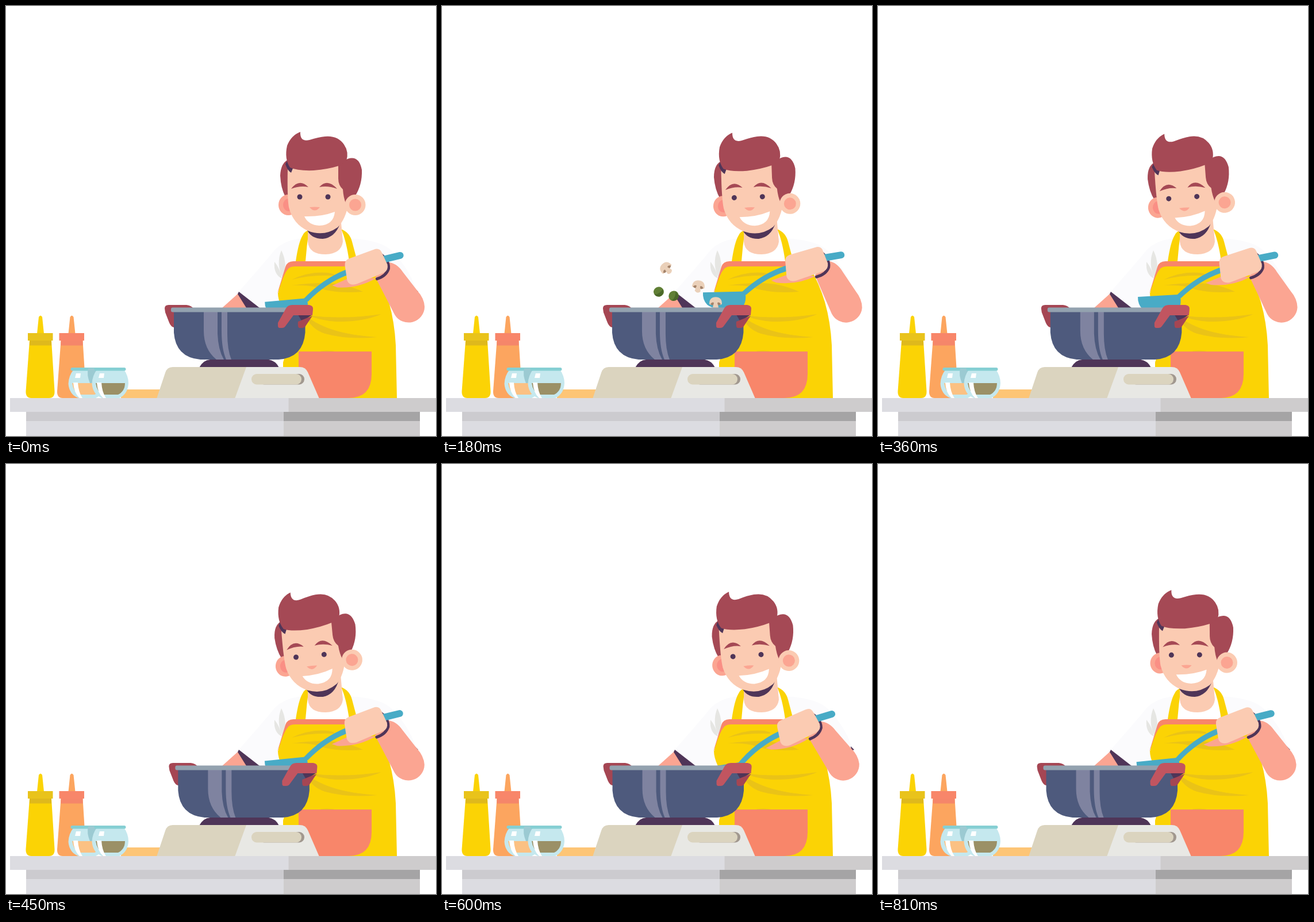
These frames come from a looping animation (748x748 px, 0.84 s). An HTML page with a canvas:

```html
<!DOCTYPE html>
<html lang="en">
<head>
<meta charset="utf-8">
<title>Cook at the stove</title>
<style>
html, body { margin: 0; width: 100%; height: 100%; overflow: hidden; background: #fff; }
canvas { display: block; width: 748px; height: 748px; }
</style>
</head>
<body>
<canvas id="stage" width="748" height="748"></canvas>
<script>
const ctx = document.getElementById('stage').getContext('2d');
const LOOP = 840, STEP = 30;
const C = {
  hair: '#a54955', dark: '#4f3558', skin: '#fbcbb2', pink: '#fba592', blush: '#fa8f85',
  yellow: '#fbd305', fold: '#eac317', orange: '#f8866a', peach: '#fca55f',
  shirt: '#fbfbfd', crease: '#e6e6e3', spoon: '#48abc6',
  pot: '#4e5a7d', shine: '#7f83a0', rim: '#93a2af', grip: '#c15560', gripDark: '#a54653',
  tan: '#dbd4bf', panel: '#e8e8e4', top: '#dcdce1', side: '#cecccd', shade: '#a5a4a5'
};

const paths = new Map();
function fill(color, d) {
  if (!paths.has(d)) paths.set(d, new Path2D(d));
  ctx.fillStyle = color;
  ctx.fill(paths.get(d));
}
function rect(color, x, y, w, h, r = 0) {
  ctx.fillStyle = color;
  ctx.beginPath();
  ctx.roundRect(x, y, w, h, r);
  ctx.fill();
}
function oval(color, x, y, rx, ry = rx) {
  ctx.fillStyle = color;
  ctx.beginPath();
  ctx.ellipse(x, y, rx, ry, 0, 0, 7);
  ctx.fill();
}
function line(color, width, d) {
  ctx.strokeStyle = color;
  ctx.lineWidth = width;
  ctx.lineCap = 'round';
  ctx.stroke(new Path2D(d));
}
function group(x, y, angle, draw) {
  ctx.save();
  ctx.translate(x, y);
  ctx.rotate(angle);
  draw();
  ctx.restore();
}
function pivot(x, y, angle, draw) {
  group(x, y, angle, () => { ctx.translate(-x, -y); draw(); });
}
// Rises from 0 to 1 at the peak time, then falls back to 0 at the loop's end
const tent = (t, peak) => t < peak ? t / peak : (LOOP - t) / (LOOP - peak);
// Smooth stirring swing, slightly biased upwards
const swing = t => 0.1 + 0.74 * Math.sin((t - 8) / LOOP * 2 * Math.PI);

function bottle(dx, body, cap, neck) {
  group(dx, 0, 0, () => {
    fill(body, 'M54 570L57 541Q60 536 63 541L66 570Z');
    fill(body, 'M41 582H79L84.5 670Q85 682 75 682H44Q34 682 34.5 670Z');
    rect(neck, 41, 582, 38, 8.5);
    rect(cap, 38, 569, 43.5, 13);
  });
}

function jar(dx, content) {
  group(dx, 0, 0, () => {
    fill('#c5e8ee', 'M118 632H164Q172 644 172 656Q171 675 156 682H126Q110 676 108.5 657Q109 643 118 632Z');
    fill(content, 'M115 656H166Q166 670 154 676H128Q117 671 115 656Z');
    fill('#fff', 'M122 639H130L129 647H120ZM117 655H125Q126 672 133 682H128Q118 673 117 655Z');
    rect('#86cfd3', 112.5, 629, 55, 5.5, 2.7);
  });
}

function worktop() {
  bottle(0, C.yellow, '#e9c31b', '#dfb91c');
  bottle(54.5, C.peach, C.orange, '#f5866a');
  rect('#fdc576', 200, 667, 70, 16);
  jar(0, '#fbc183');
  fill('#9bcad2', 'M143 630H157V634Q151 643 151 656H146Q140 642 143 630Z');
  jar(41, '#9b9066');

  fill(C.dark, 'M336 629Q343 616 355 615H457Q469 617 475 629Z');
  fill(C.tan, 'M262 683L277 638Q280 628 290 628H420V683Z');
  fill(C.panel, 'M398 683L418 628H511Q521 628 525 637L545 683Z');
  rect('#a1988f', 440, 640, 79, 18.5, 9);
  rect(C.tan, 427, 640, 87, 18.5, 9);

  rect(C.top, 7, 682, 485, 24);
  rect(C.side, 491.5, 682, 257, 24);
  rect(C.top, 35, 706, 448, 42);
  rect('#cccbcf', 35, 706, 448, 16);
  rect(C.side, 483, 706, 237, 42);
  rect(C.shade, 483, 706, 237, 16);
}

function torso() {
  fill(C.shirt, 'M518 404Q484 406 466 426Q455 440 404 498L438 526H500L600 540L715 497Q700 453 668 423Q645 405 590 404Z');
  fill(C.crease, 'M479 425Q469 449 482 475Q491 449 479 425ZM467 445Q465 467 480 474Q477 457 467 445Z');
  fill(C.pink, 'M375 526L404 500L419 526Z');
  fill(C.dark, 'M405 497L441 525H418L403 501Z');
  fill(C.dark, 'M711 491L717 497L712 499Z');
  fill('#fff', 'M523 408H590L597 445H521Z');

  fill(C.orange, 'M472 500L486 454Q489 444 500 444H604V460H490Z');
  fill(C.yellow, 'M473 500Q483 464 492 456Q496 453 503 453H604L640 455Q656 482 666 515Q676 550 678 590L680 683H482V620L500 560Q473 520 473 500Z');
  fill(C.yellow, 'M504 444Q509 410 516 399Q519 392 527 390Q523 417 521 444Z');
  fill(C.yellow, 'M583 388Q598 394 602 410L611 444H597Q592 408 583 388Z');
  fill(C.fold, 'M497 476Q528 461 560 464Q576 467 569 469Q530 467 497 476ZM497 486Q548 479 580 484Q602 488 621 497Q570 501 540 489Q520 485 497 486Z');
  fill(C.fold, 'M526 538Q585 546 653 536Q620 550 575 549Q545 547 526 538ZM520 537Q558 571 646 576Q595 581 555 570Q530 562 520 537Z');
  fill(C.fold, 'M541 602Q556 597 579 602Z');
  fill(C.orange, 'M509 601H636V640Q636 682 595 682H509Z');
}

function head(tilt) {
  fill(C.skin, 'M525 380V410Q527 432 556 432Q583 431 586 410L582 366Z');
  pivot(550, 402, tilt, () => {
    fill(C.dark, 'M523 388Q530 405 551 405Q572 403 581 379L560 370Z');
    fill(C.hair, 'M492 267Q478 272 477 295Q478 317 486 332L494 330L500 280Z');
    oval(C.pink, 491, 346, 17, 18);
    oval(C.blush, 492, 346, 10, 11);
    fill(C.skin, 'M490 284Q489 333 492 350Q499 379 525 391Q553 402 577 385Q591 371 596 342L594 285L578 272L500 278Z');
    fill(C.dark, 'M490 267L486 275Q490 287 496 290L500 280Z');
    fill(C.hair, 'M578 276L594 266Q614 259 619 285Q620 311 607 331L591 343Q587 333 586 319Q578 312 578 300Z');
    oval(C.skin, 607.5, 346, 18);
    oval(C.pink, 607.5, 346, 10.5);
    fill(C.hair, 'M512 219Q496 225 489 243Q484 266 494 281Q507 287 535 286Q560 284 579 278L592 270Q597 254 588 241Q577 225 555 227Q544 228 528 233Q511 237 512 219Z');
    fill(C.hair, 'M496 318Q510 299 526 315Q512 312 496 318ZM545 315Q559 299 576 318Q560 312 545 315Z');
    oval(C.dark, 511, 332, 4.5);
    oval(C.dark, 560, 332, 4.5);
    fill(C.pink, 'M528 350Q537 349 546 350Q537 361 528 350Z');
    fill('#fff', 'M519 366Q548 367 572 358Q570 381 545 382Q526 381 519 366Z');
  });
}

function stirringArm(w) {
  ctx.save();
  ctx.translate(2 * w, 0);
  pivot(700, 540, 0.088 * w, () => {
    fill(C.pink, 'M642 472L676 537A28 28 0 0 0 728 523Q727 508 715 495L690 463Q679 447 664 446Z');
    fill(C.pink, 'M567 487L600 472L643 474Q612 492 576 490Z');
    line(C.dark, 5, 'M651 432Q666 443 665 457Q661 470 645 475');
    fill(C.spoon, 'M450 516L523 509Q529 532 515 541Q475 547 459 537Q450 529 450 516Z');
    fill(C.spoon, 'M517 511Q549 476 592 458.5V469Q556 483 525 515Z');
    line(C.spoon, 12, 'M658 440.5L685 434');
    fill(C.skin, 'M596 440L639 424Q649 420 653 429L663 450Q665 460 657 464L610 484Q597 488 593 478L589 452Q588 443 596 440Z');
  });
  ctx.restore();
}

function mushroom(x, y, angle) {
  group(x, y, angle, () => {
    fill('#ead0b9', 'M-11 2Q-11 -10 0 -10Q11 -10 11 2Q8 5 4 2L5 9Q0 14 -5 9L-4 2Q-8 5 -11 2Z');
    fill('#a4836a', 'M-9 2Q-6 -2 -3 0L-4 4Q-7 5 -9 2ZM9 2Q6 -2 3 0L4 4Q7 5 9 2Z');
  });
}

function leaf(x, y, angle) {
  group(x, y, angle, () => {
    oval('#607f35', 0, 0, 9, 8.5);
    fill('#4b6829', 'M-8 3Q0 5 8 -3Q8 8 0 8.5Q-6 8 -8 3Z');
  });
}

function food(t) {
  const toss = (apex, peak, pull) => apex + pull * (t - peak) ** 2;
  const turn = (t - 270) / 150;
  ctx.save();
  ctx.beginPath();
  ctx.rect(290, 300, 240, 238);
  ctx.clip();
  leaf(377, toss(496, 200, 0.0027), -0.2);
  leaf(403, toss(503.5, 197, 0.0027), -0.8);
  mushroom(390, toss(450, 215, 0.00517), -1.4 - turn);
  mushroom(446, toss(482, 215, 0.0043), 0.4 + turn * 0.4);
  mushroom(476, toss(511, 215, 0.0043), 0);
  ctx.restore();
}

function pot(dx) {
  group(dx, 0, 0, () => {
    fill(C.gripDark, 'M276 526Q276 520 283 520H314Q322 521 326 526H300V559H292Q287 558 284 551L277 533Z');
    fill(C.pot, 'M292 531H520.5V568Q517 612 474 615H338Q295 611 292 568Z');
    fill(C.shine, 'M344 531H368V570Q369 598 379 615H366Q344 597 344 565ZM375 531H385V570Q385 598 392 615H383Q375 597 375 565Z');
    rect(C.rim, 287, 524.5, 238, 8, 3);
    fill(C.dark, 'M508 537H533L515 549Z');
    fill(C.gripDark, 'M508 549L533 539L521 557Q519 560 515 560H510Q507 559 508 549Z');
    fill(C.grip, 'M473 551L487 526Q490 520 498 520H527Q535 521 534 528L533 538H500L486 557Q484 560 480 560H476Q473 560 473 556Z');
  });
}

function render(now) {
  const t = Math.floor(now % LOOP / STEP) * STEP;
  ctx.clearRect(0, 0, 748, 748);
  torso();
  head(-0.104 * tent(t, 490));
  stirringArm(swing(t));
  food(t);
  pot(8.5 * tent(t, 390));
  worktop();
}

const start = performance.now();
function tick() {
  render(performance.now() - start);
  requestAnimationFrame(tick);
}
tick();
</script>
</body>
</html>
```
